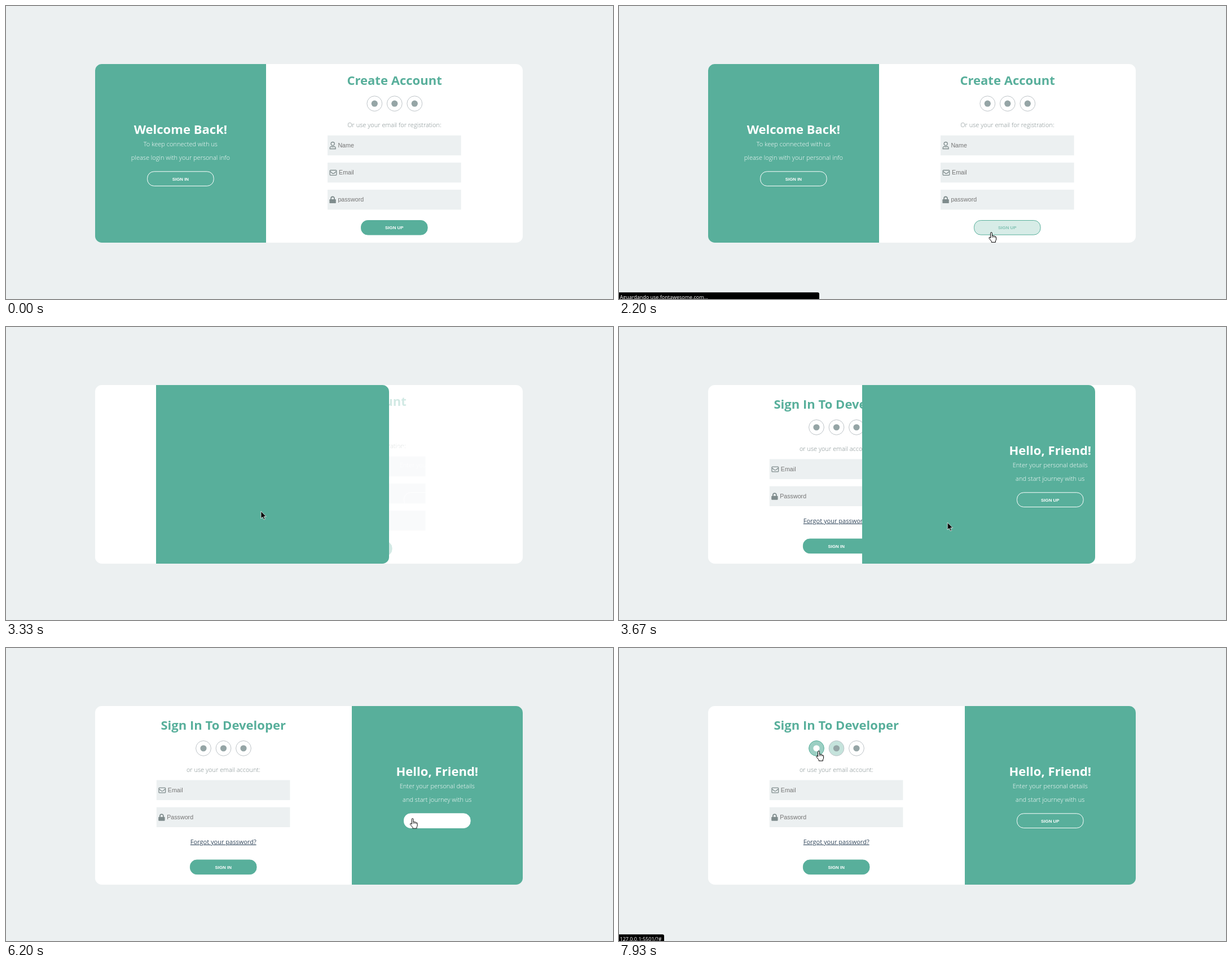
Recreate the animation shown at these times as an HTML page. Size 1076 by 520 pixels, loop 8000 ms.

```html
<!DOCTYPE html>
<html lang="en">
<head>
<meta charset="utf-8">
<title>Sign in and sign up</title>
<style>
  html, body { margin: 0; width: 100%; height: 100%; overflow: hidden; background: #ecf0f1; }
  #stage { position: absolute; left: 0; top: 0; width: 1076px; height: 520px; overflow: hidden; }
  #stage > * { position: absolute; left: 0; top: 0; }
  #card { left: 158px; top: 103.3px; width: 758px; height: 316.4px; border-radius: 11.8px; background: #fff; }
  #panel { position: absolute; left: 0; top: 0; width: 40%; height: 100%; background: #58af9b; }
  svg { width: 1076px; height: 520px; font: 300 11.03px "Open Sans", sans-serif; }
  text { text-anchor: middle; }
  .title { font-size: 22.06px; font-weight: 700; }
  .label { font: 700 7.88px "Liberation Sans", Arial, sans-serif; }
  .hint { font: 10.7px "Liberation Sans", Arial, sans-serif; fill: #757575; text-anchor: start; }
  .link { font-weight: 400; fill: #34495e; text-decoration: underline; }
  .note { fill: #7f8c8d; }
  .status { font-size: 9px; font-weight: 400; fill: #fff; text-anchor: start; }
</style>
</head>
<body>
<div id="stage">
  <div id="card"></div>
  <svg id="forms"></svg>
  <div id="panelBox"><div id="panel"></div></div>
  <svg id="top"></svg>
</div>
<script>
const LOOP = 8000, GREEN = '#58af9b', WHITE = '#ffffff', CLEAR = 'rgba(255,255,255,0)';
const GREY = '#95a5a6', LINE = '#bdc3c7';
const $ = id => document.getElementById(id);

Object.assign($('panelBox').style, { left: '158px', top: '103.3px', width: '758px', height: '316.4px' });

// Drawing helpers
const text = (x, y, str, cls = '', fill = '') =>
  `<text x="${x}" y="${y}" class="${cls}" ${fill && `fill="${fill}"`}>${str}</text>`;

const button = (id, cx, y, str, fill, stroke) => `
  <rect id="${id}" x="${cx - 58.8}" y="${y}" width="117.6" height="25.6" rx="11.8" fill="${fill}" stroke="${stroke}"/>
  <text id="${id}Text" x="${cx}" y="${y + 15.7}" class="label" fill="${WHITE}">${str}</text>`;

const socials = (id, cx, cy) => [-1, 0, 1].map(i => `
  <circle id="${id}Ring${i + 1}" cx="${cx + i * 35.5}" cy="${cy}" r="13.4" fill="${CLEAR}" stroke="${LINE}"/>
  <circle id="${id}Dot${i + 1}" cx="${cx + i * 35.5}" cy="${cy}" r="5.6" fill="${GREY}"/>`).join('');

const icons = {
  user: `<g fill="none" stroke="#7f8c8d" stroke-width="1.3"><circle cx="5.8" cy="-3" r="3.1"/>
    <path d="M.8 5.9V4.6Q.8 1.7 3.6 1.7Q5.8 2.6 8 1.7Q10.8 1.7 10.8 4.6V5.9Z"/></g>`,
  mail: `<g fill="none" stroke="#7f8c8d" stroke-width="1.3"><rect x=".8" y="-4.3" width="11.6" height="8.8" rx="1"/>
    <path d="M1-2.2L5.5 1.3Q6.6 2 7.7 1.3L12.2-2.2"/></g>`,
  lock: `<rect x="0" y="-.8" width="11.4" height="7" rx="1.2" fill="#7f8c8d"/>
    <path d="M2.7-.5V-2.4a3 3 0 0 1 6 0V-.5" fill="none" stroke="#7f8c8d" stroke-width="1.8"/>`
};

const field = (x, y, icon, str) => `
  <rect x="${x}" y="${y}" width="236.6" height="35.4" fill="#ecf0f1"/>
  <g transform="translate(${x + 3.4} ${y + 17.9})">${icons[icon]}</g>
  ${text(x + (icon === 'mail' ? 20 : 18.4), y + 21.3, str, 'hint')}`;

const status = (id, width, str) => `<g id="${id}" opacity="0">
  <path d="M0 508.3H${width - 3}q3 0 3 3V520H0Z"/>${text(1.5, 520, str, 'status')}</g>`;

const column = (id, cx, title, first, second, label) => `<g id="${id}" fill="${WHITE}">
  ${text(cx, 227, title, 'title')}${text(cx, 249, first)}${text(cx, 272.7, second)}
  ${button(id + 'Btn', cx, 293.8, label, CLEAR, WHITE)}</g>`;

$('forms').innerHTML = `
  <g id="join">
    ${text(688.6, 140, 'Create Account', 'title', GREEN)}
    ${socials('join', 688.8, 173.2)}
    ${text(688.4, 215, 'Or use your email for registration:', 'note')}
    ${field(570, 229.7, 'user', 'Name')}
    ${field(570, 277.9, 'mail', 'Email')}
    ${field(570, 326, 'lock', 'password')}
    ${button('joinBtn', 688.3, 380.5, 'SIGN UP', GREEN, GREEN)}
  </g>
  <g id="login">
    ${text(385.2, 145, 'Sign In To Developer', 'title', GREEN)}
    ${socials('login', 385.5, 178)}
    ${text(385.3, 220, 'or use your email account:', 'note')}
    ${field(266.8, 234.5, 'mail', 'Email')}
    ${field(266.8, 282.6, 'lock', 'Password')}
    ${text(385.2, 347.8, 'Forgot your password?', 'link')}
    ${button('loginBtn', 385.2, 376, 'SIGN IN', GREEN, GREEN)}
  </g>`;

$('top').innerHTML = `
  ${column('welcome', 309.4, 'Welcome Back!', 'To keep connected with us', 'please login with your personal info', 'SIGN IN')}
  ${column('hello', 764.3, 'Hello, Friend!', 'Enter your personal details', 'and start journey with us', 'SIGN UP')}
  ${status('waiting', 355, 'Aguardando use.fontawesome.com...')}
  ${status('address', 80, '127.0.0.1:5501/?#')}
  <g id="pointer">
    <path id="arrow" d="M0 0V13L3 10.3 5.1 15 7.2 14.1 5.2 9.6H9.2Z" stroke="#fff" stroke-width=".8"/>
    <g id="hand" fill="#fff" stroke="#000" stroke-linejoin="round">
      <path d="M-1.4 10V1.2a1.4 1.4 0 0 1 2.8 0V5.6Q3.2 5 3.8 6.2Q5.6 5.5 6.3 7Q8.6 6.7 8.6 9V12Q8.6 13.5 7.4 15V17.3H.2V15.4L-3.8 10.6Q-4.6 8.8-3.2 8.3Q-2.2 8.4-1.4 10Z"/>
      <path d="M1.4 5.6V9M3.8 6.2V9M6.3 7V9.3" fill="none" stroke-width=".8"/>
    </g>
  </g>`;

// Rows are [time, properties, easing]; the ends are held.
function play(id, rows) {
  const first = rows[0], last = rows[rows.length - 1];
  const all = [...rows];
  if (first[0] > 0) all.unshift([0, first[1]]);
  if (last[0] < LOOP) all.push([LOOP, last[1]]);
  $(id).animate(all.map(([t, props, easing = 'linear']) => ({ offset: t / LOOP, easing, ...props })),
    { duration: LOOP, iterations: Infinity });
}
const steps = (id, prop, rows) =>
  play(id, rows.map(([t, value]) => [t, { [prop]: value }, 'step-end']));
const fade = (id, prop, rows) =>
  play(id, rows.map(([t, value, easing]) => [t, { [prop]: value }, easing]));

// Switch from sign up to sign in
const CLICK = 2917, SLIDE = 1300;
const at = part => CLICK + part * SLIDE;
const slide = [[0, 0, 40], [.25, 5, 50], [.5, 25, 60], [.75, 45, 50], [1, 60, 40]];
play('panel', slide.map(([part, left, width]) =>
  [at(part), { left: left + '%', width: width + '%' }, 'ease']));
steps('panel', 'borderRadius', [[0, '11.8px 0 0 11.8px'], [CLICK, '0 11.8px 11.8px 0']]);
play('join', [
  [at(0), { opacity: 1, transform: 'translateX(0)' }, 'ease'],
  [at(.25), { opacity: .5, transform: 'translateX(-63px)' }, 'ease'],
  [at(.5), { opacity: 0, transform: 'translateX(-63px)' }]
]);
steps('welcome', 'opacity', [[0, 1], [CLICK, 0]]);
steps('hello', 'opacity', [[0, 0], [CLICK, 1]]);
steps('login', 'opacity', [[0, 0], [2995, 1]]);

// Button hovers; the page reloads while the sign-up button is held under the pointer
const hover = [[1530, 0], [1800, 1], [2060, 1, 'step-end'], [2061, 0], [2200, .76], [2300, 1], [2340, 1], [2640, 0]];
const mix = k => `color-mix(in srgb, ${WHITE} ${k * 100}%, ${GREEN})`;
fade('joinBtn', 'fill', hover.map(([t, k, e]) => [t, mix(k), e]));
fade('joinBtnText', 'fill', hover.map(([t, k, e]) => [t, mix(1 - k), e]));
fade('welcomeBtn', 'fill', [[2865, CLEAR], [CLICK, 'rgba(255,255,255,.3)']]);
fade('helloBtn', 'fill', [[4200, CLEAR], [4395, WHITE], [6270, WHITE], [6770, CLEAR]]);
fade('helloBtnText', 'fill', [[4200, WHITE], [4395, GREEN], [6199, GREEN, 'step-end'], [6200, WHITE]]);

// Social hovers
const tint = k => `rgba(88,175,155,${k})`;
fade('loginRing2', 'fill', [[6820, tint(0)], [7060, tint(1)], [7130, tint(1)], [7470, tint(0)]]);
fade('loginRing1', 'fill', [[7200, tint(0)], [7460, tint(1)], [7770, tint(1)], [7930, tint(.35)]]);
fade('loginRing0', 'fill', [[7770, tint(0)], [7930, tint(.6)]]);
[[2, 6820, 7130], [1, 7200, 7770], [0, 7790, 7999]].forEach(([i, on, off]) => {
  steps('loginDot' + i, 'fill', [[0, GREY], [on, WHITE], [off, GREY]]);
  steps('loginRing' + i, 'stroke', [[0, LINE], [on, GREEN], [off, LINE]]);
});

steps('waiting', 'opacity', [[0, 0], [1780, 1], [2340, 0]]);
steps('address', 'opacity', [[0, 0], [6850, 1]]);

// Pointer
const path = [
  [200, 1008, 438], [400, 870, 404], [600, 725, 370], [800, 600, 345], [930, 547, 334],
  [1070, 547, 334], [1250, 554, 255], [1400, 600, 325], [1600, 652, 394], [1760, 660, 402],
  [2220, 660, 402], [2400, 625, 412], [2600, 500, 375], [2800, 390, 308], [2870, 352, 309],
  [3000, 362, 311], [3300, 440, 325], [3670, 582, 347], [3950, 680, 330], [4200, 748, 312],
  [4395, 763, 309], [6199, 763, 309], [6200, 721, 303], [6450, 620, 262], [6700, 490, 205],
  [6860, 428, 181], [7000, 422, 181], [7070, 421, 181], [7400, 388, 181], [7730, 386, 181],
  [7930, 354, 183]
];
play('pointer', path.map(([t, x, y]) => [t, { transform: `translate(${x}px, ${y}px)` }]));
steps('pointer', 'opacity', [[0, 0], [200, 1]]);
const handOn = [[0, 0], [1530, 1], [2340, 0], [2865, 1], [CLICK, 0], [4180, 1], [6270, 0], [6820, 1]];
steps('hand', 'opacity', handOn);
steps('arrow', 'opacity', handOn.map(([t, on]) => [t, 1 - on]));
</script>
</body>
</html>
```
